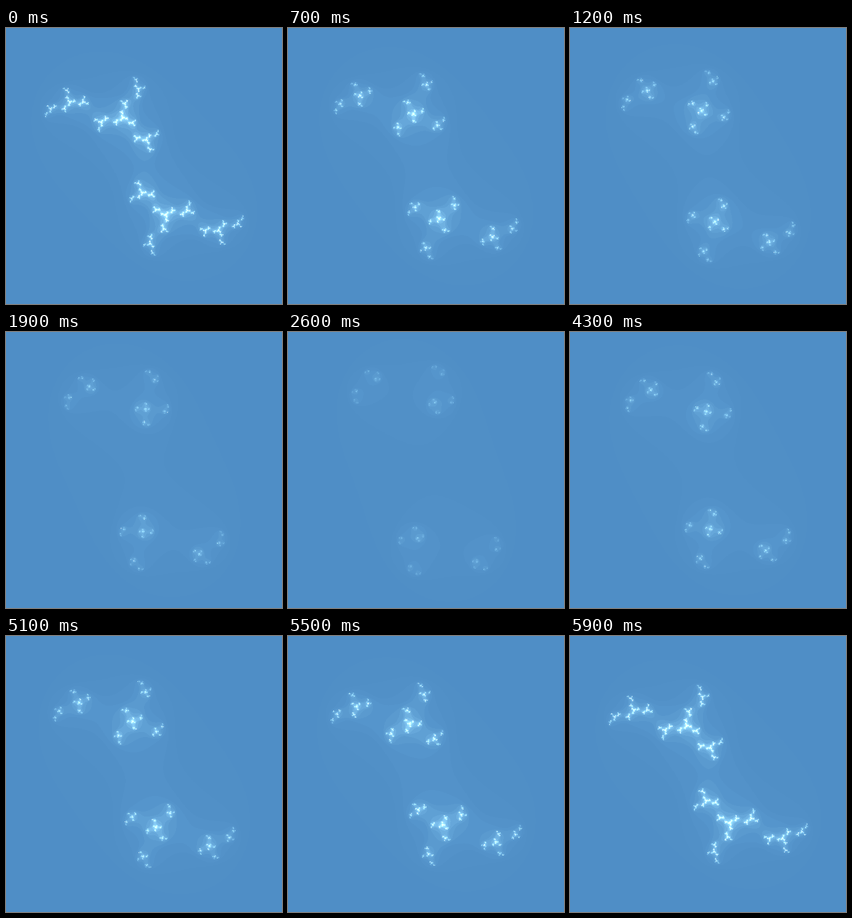
An HTML page with a canvas that plays this animation: 500 px wide and 500 px high, repeating every 6000 ms.

```html
<!DOCTYPE html>
<html lang="en">
<head>
<meta charset="utf-8">
<title>Julia set</title>
<style>
html, body { margin: 0; width: 100%; height: 100%; overflow: hidden; background: #4f8ec6; }
canvas { display: block; width: 500px; height: 500px; }
</style>
</head>
<body>
<canvas id="stage" width="500" height="500"></canvas>
<script>
const SIZE = 500, SPAN = 3.6, MAX_ITER = 60;
const STEP_MS = 100, STEPS = 30;
const ctx = document.getElementById('stage').getContext('2d');
const image = ctx.createImageData(SIZE, SIZE);
const pixels = new Uint32Array(image.data.buffer);

// Colour by escape count: blue rising through pale cyan to white
const palette = new Uint32Array(MAX_ITER + 1);
for (let n = 0; n <= MAX_ITER; n++) {
  const t = Math.pow(n / 16, 2.7);
  const mix = (base, gain) => Math.min(255, Math.round(base + gain * t));
  palette[n] = (255 << 24 | mix(198, 130) << 16 | mix(142, 165) << 8 | mix(79, 150)) >>> 0;
}

function escapeCount(x, y, cx, cy) {
  let n = 0, xx = x * x, yy = y * y;
  while (xx + yy < 4 && n < MAX_ITER) {
    y = 2 * x * y + cy;
    x = xx - yy + cx;
    xx = x * x;
    yy = y * y;
    n++;
  }
  return n;
}

function draw(step) {
  const cx = 0.043 + 0.0323 * step;
  const cy = -0.991 + 0.0117 * step;
  const unit = SPAN / SIZE, mid = SIZE / 2;
  for (let j = 0, k = 0; j < SIZE; j++) {
    const y = (j - mid) * unit;
    for (let i = 0; i < SIZE; i++, k++) {
      pixels[k] = palette[escapeCount((i - mid) * unit, y, cx, cy)];
    }
  }
  ctx.putImageData(image, 0, 0);
}

const start = performance.now();
let shown = -1;

function tick() {
  const elapsed = Math.max(0, performance.now() - start);
  const tock = Math.floor(elapsed / STEP_MS) % (2 * STEPS);
  const step = tock < STEPS ? tock : 2 * STEPS - 1 - tock;
  if (step !== shown) {
    draw(step);
    shown = step;
  }
  requestAnimationFrame(tick);
}
tick();
</script>
</body>
</html>
```
